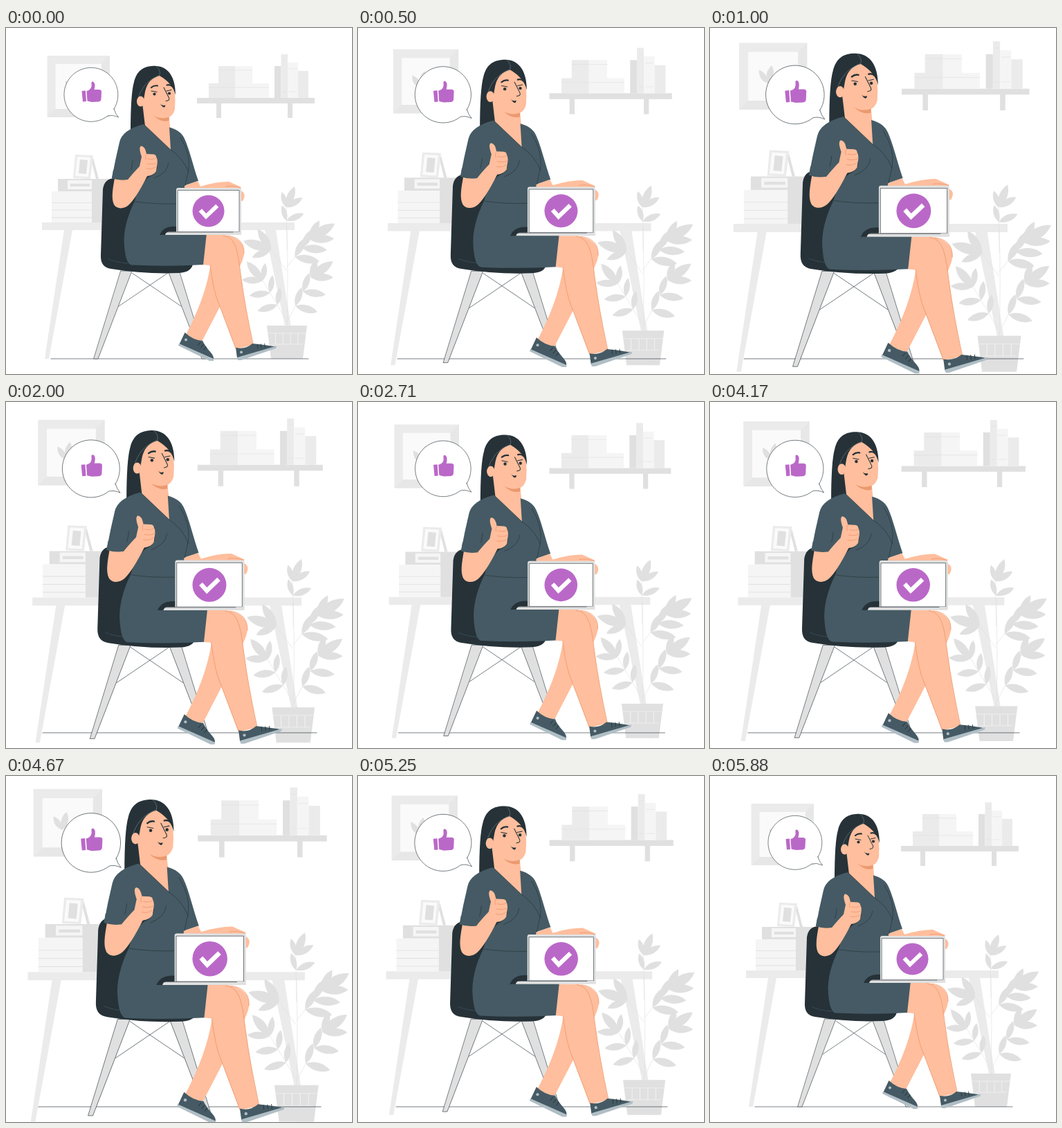
Write an HTML page that moves like this. It is 500x500 px and loops after 5930 ms.

```html
<!DOCTYPE html>
<html lang="en">
<head>
<meta charset="utf-8">
<title>Approved</title>
<style>
html, body { margin: 0; height: 100%; overflow: hidden; background: #fff; }
svg { display: block; width: 100vw; height: 100vh; }
.g1 { fill: #e0e0e0; } .g2 { fill: #ebebeb; } .g3 { fill: #f5f5f5; } .g4 { fill: #fafafa; }
.dark { fill: #263238; } .dress { fill: #455a64; } .skin { fill: #ffbe9d; } .pink { fill: #ba68c8; }
.sole { fill: #b0bec5; }
.ink, .fold, .soft, .ticks { fill: none; stroke: #263238; stroke-width: .6; }
.ink, .fold, .soft { stroke-linecap: round; stroke-linejoin: round; }
.fold { stroke: #eb996e; stroke-width: .8; }
.soft { stroke: #e0e0e0; }
/* a wide dashed stroke makes a row of evenly spaced lines */
.ticks { stroke-dasharray: .8 10; }
.lace { stroke-width: 6; stroke-dasharray: .8 4.5; }
</style>
</head>
<body>
<svg viewBox="0 0 500 500">
  <!-- data-c is the centre each layer grows from -->
  <g data-c="264 258">
    <path class="g2" d="M59.5 40H150V129H59.5Z"/>
    <path class="g1" opacity=".35" d="M150 40V129H59.5L71.5 117H138V52Z"/>
    <path class="g4" d="M71.5 52H138V117H71.5Z"/>
    <path class="g1" d="M98 94Q85 90 86 76Q98 81 98 94Q92 80 103 70Q110 83 98 94Z"/>

    <g id="shelf">
      <path class="g1" d="M276 101H446V109H276ZM304 109h7v21h-7ZM407 109h7v21h-7Z"/>
      <path class="g2" d="M307 55h24v25h-24ZM293 80h38v21h-38Z"/>
      <path class="g3" d="M331 55h25v25h-25ZM331 80h49v21h-49Z"/>
      <path class="soft" d="M307 61H356M293 86H380"/>
    </g>

    <path class="g2" d="M52 281H417V292H52ZM84 292H96L62 478H56ZM374 292H390L419 478H413Z"/>
    <path class="g1" d="M75 218h75v18h-75ZM124 236h26v45h-26Z"/>
    <path class="g3" d="M89 220h35v13h-35ZM66 236h58v45h-58Z"/>
    <path class="g1" d="M93 225h28v4h-28ZM123 190L126 188L134 218H130Z"/>
    <path class="ticks" style="stroke:#e0e0e0;stroke-width:58" d="M95 252V275"/>
    <path class="g2" d="M100 183L126 184L122 218L97 217Z"/>
    <path class="g4" d="M103 186L122 187L119 215L100 214Z"/>
    <path class="g1" d="M107 190L118 191L116 211L105 210Z"/>

    <g id="plant" class="g1"><path class="soft" d="M406 430Q408 360 406 288"/></g>
    <path class="g1" d="M377 430H435L429 478H383Z"/>
    <path class="ticks" style="stroke:#f5f5f5;stroke-width:16" d="M389 449H426"/>
    <path class="soft" style="stroke:#f5f5f5" d="M379 441H433M385 457H428"/>
  </g>

  <g data-c="251 478"><path class="ink" d="M65 478H437"/></g>

  <g data-c="123.5 95">
    <path class="ink" style="fill:#fff" d="M156 117A39 39 0 1 0 147 127Q154 125 162.500 129Q158 124 156 117Z"/>
    <path class="pink" d="M109.500 91L115 90.500L116 106L111 106.500ZM116.500 91Q125 89 123.500 80Q123 77 126 77.500Q130 80 127.500 89H135Q138 89.500 138 92L137.500 103Q137 106 134 106.500L124 107L117.500 105.500Z"/>
  </g>

  <g data-c="210 346">
    <path class="ink" d="M182 354L253 402M234 354L163 402"/>
    <path id="leg" class="ink" style="fill:#e0e0e0" d="M166 351H182L133 478H127Z"/>
    <use href="#leg" transform="translate(416) scale(-1 1)"/>
    <path class="dark" d="M158 217Q142 217 140 233L137 328Q136 346 152 348Q200 356 250 354Q268 353 270 341L215 300L205 220Z"/>
    <path class="ink" style="stroke:#455a64" d="M148 334Q160 339 176 340"/>
  </g>

  <g data-c="270.5 268">
    <!-- legs and shoes -->
    <path class="skin" d="M305 300C334 298 345 311 344 326C343 340 325 368 309 403L282 455L260 443Q288 390 295 345Z"/>
    <path class="fold" d="M320 300Q345 303 344 326"/>
    <path class="dress" d="M258.500 440Q270 451 284 452Q288 460 296 469Q302 476 299 480L250 458Z"/>
    <path class="sole" d="M250 456L300 478V481H294L249 459Z"/>
    <path class="ticks lace" d="M279 456L291 466"/>
    <circle class="sole" cx="260" cy="450.500" r="2"/>
    <path class="skin" d="M284 342L295 343Q300 382 307 397L332 464L357 458Q345 400 340 362C336 335 335 299 314 299H287Z"/>
    <path class="fold" d="M295 343Q300 382 307 397L332 463M314 300C335 301 336 335 340 362Q345 400 357 456"/>
    <path class="dress" d="M332 462Q346 465 356 456Q376 458 391 461L340 478L334 477Z"/>
    <path class="sole" d="M334 476L391 459.500L390 463L340 480L335 480Z"/>
    <path class="ticks lace" d="M363 460L376 458.500"/>
    <circle class="sole" cx="340" cy="468.500" r="2"/>

    <!-- neck and head -->
    <path class="skin" d="M197 100L199 142L238 178L239 160L235 122Z"/>
    <path class="skin" d="M196 85C203 64 225 62 240 72Q246 92 244 117C242 126 236 130.500 228 130.500Q204 129 199 108Z"/>
    <path d="M213 126.500Q224 133 235.500 128.500V134Q224 137 213 126.500Z" fill="#eb996e"/>
    <path class="dark" d="M211 55C232 53 245 68 245 97Q241 80 222 69Q205 73 201 92L197.500 112L201 142Q194 149 180 151Q180 95 185 78C189 62 198 56 211 55Z"/>
    <path class="ink" style="stroke:#72828a" d="M217 55Q224 61 222 68Q196 78 190 105"/>
    <ellipse class="skin" cx="194.500" cy="106" rx="5.500" ry="7.500"/>
    <path class="ink" style="stroke-width:2.200" d="M210 86Q214 82.500 219 83.500M232.500 82.500Q237 81 240.500 84.500"/>
    <path class="ink" style="stroke-width:1" d="M210 91L218 92.500M232 91L239 89.500M228 86L235.500 101Q237 105 231 105.500"/>
    <circle class="dark" cx="214.500" cy="95.500" r="2.100"/>
    <circle class="dark" cx="236" cy="94.500" r="2.100"/>
    <path class="dark" d="M222.500 109Q225 113 230.500 111.500Q229 119 222.500 109Z"/>

    <!-- dress -->
    <path class="dress" d="M199 139Q168 147 164 165Q158 190 153 217Q170 222 188 217Q191 235 186 250C175 272 169 295 171 315Q173 342 182 342.500Q235 345 285 342L290 296L262 255L260 227L278 221C270 198 265 175 258 160Q253 148 236 143.500L238 176Z"/>
    <path class="ink" d="M199 139L238 176Q256 188 264 208M252 158Q267 182 264 204L259 227M187 251Q215 255 245 254M214 217Q233 210 235 195M183 192Q182 206 177 214"/>

    <!-- raised arm -->
    <path class="dark" d="M216 186Q224 209 207 215Q196 222 185 250L180 240Z"/>
    <path class="skin" d="M157 217C154 234 152 246 156 255C160 262 170 262 177 256Q188 246 204 214Q213 213 217 207L218 200Q220 191 217 186Q217 183 213 182.500L203 182Q201 171 195.500 170.500Q191 172 196 186L193 200Q187 206 176 219Z"/>
    <path class="fold" d="M203 182Q200 186 202 190M205 189Q212 191 217 188M204 196Q212 198 218 195M203 203Q210 205 216 201"/>
    <path class="dress" d="M155 205L153 217Q164 221 176 219L185 206Z"/>

    <!-- hand on the laptop -->
    <path class="skin" d="M258 228L277 221L281 229Q304 222 322 222L340 230L337 234Q349 238 342 250L337 249V236H258Z"/>
    <path class="fold" d="M318 229Q328 227 339 231"/>

    <!-- laptop -->
    <path class="dark" d="M222 299Q228 285 248 287V299Z"/>
    <path class="g1" d="M249 231H337Q340 231 340 234V296H246V234Q246 231 249 231Z"/>
    <path class="ink" style="fill:#fff" d="M248.500 234.500H337V294.500H248.500Z"/>
    <path class="g1" d="M235 294.500H340V299H230Q231 295 235 294.500Z"/>
    <path class="ink" d="M233 295H328"/>
    <circle class="pink" cx="292.500" cy="264.500" r="23"/>
    <path d="M280.800 263.200L289 272.300L305.200 256.800" fill="none" stroke="#fff" stroke-width="6"/>
  </g>
</svg>
<script>
const byId = id => document.getElementById(id);

function addPath(parent, cls, d) {
  const p = document.createElementNS(parent.namespaceURI, 'path');
  p.setAttribute('class', cls);
  p.setAttribute('d', d);
  parent.append(p);
}

// books stand side by side on the shelf
let bookX = 388;
[46, 63, 51, 39].forEach((h, i) => {
  const w = i < 2 ? 9.5 : 15, top = 101 - h;
  addPath(byId('shelf'), ['g1', 'g2', 'g3', 'g2'][i], `M${bookX} ${top}h${w}v${h}h${-w}Z`);
  if (i % 3) addPath(byId('shelf'), 'soft', `M${bookX + 2} ${top + 9}h${w - 4}M${bookX + 2} 92h${w - 4}`);
  bookX += w;
});

// a leaf drawn along the x axis, then turned into place
function leaf(x, y, deg, len) {
  const w = len * .22;
  addPath(byId('plant'), 'g1', `M0 0C${len * .3} ${-w} ${len * .7} ${-w} ${len} 0C${len * .7} ${w} ${len * .3} ${w} 0 0Z`);
  byId('plant').lastChild.setAttribute('transform', `translate(${x} ${y}) rotate(${deg})`);
}

// a twig from (x, y) to (tx, ty): pairs of leaves spread around aim, one more at the tip
function twig(x, y, tx, ty, aim, spread, pairs, len) {
  addPath(byId('plant'), 'soft', `M${x} ${y}L${tx} ${ty}`);
  leaf(tx, ty, aim, len * 1.2);
  for (let i = 0; i < pairs; i++) {
    const k = 1 - i * .32, px = x + (tx - x) * k, py = y + (ty - y) * k;
    leaf(px, py, aim + spread * (1 + i * .2), len);
    leaf(px, py, aim - spread, len * .85);
  }
}
twig(406, 320, 405, 259, -68, 38, 2, 27);
twig(406, 345, 438, 305, -31, 30, 3, 36);
twig(406, 425, 440, 360, -35, 36, 3, 33);
twig(405, 350, 383, 320, -163, 40, 1, 35);
twig(404, 420, 371, 365, -130, -48, 3, 30);

// heartbeat: rise one beat, sink two, rise one, sink one
const LOOP = 5930, BEAT = 1176;
const layers = [...document.querySelectorAll('[data-c]')];

function pulse(t) {
  const b = t / BEAT;
  if (b < 1) return b;
  if (b < 3) return (3 - b) / 2;
  return Math.max(0, 1 - Math.abs(4 - b));
}

function draw(now) {
  const s = 1 + .1 * pulse(now % LOOP);
  for (const g of layers) {
    const [x, y] = g.dataset.c.split(' ');
    g.setAttribute('transform', `translate(${x} ${y}) scale(${s}) translate(${-x} ${-y})`);
  }
  requestAnimationFrame(draw);
}
draw(0);
</script>
</body>
</html>
```
